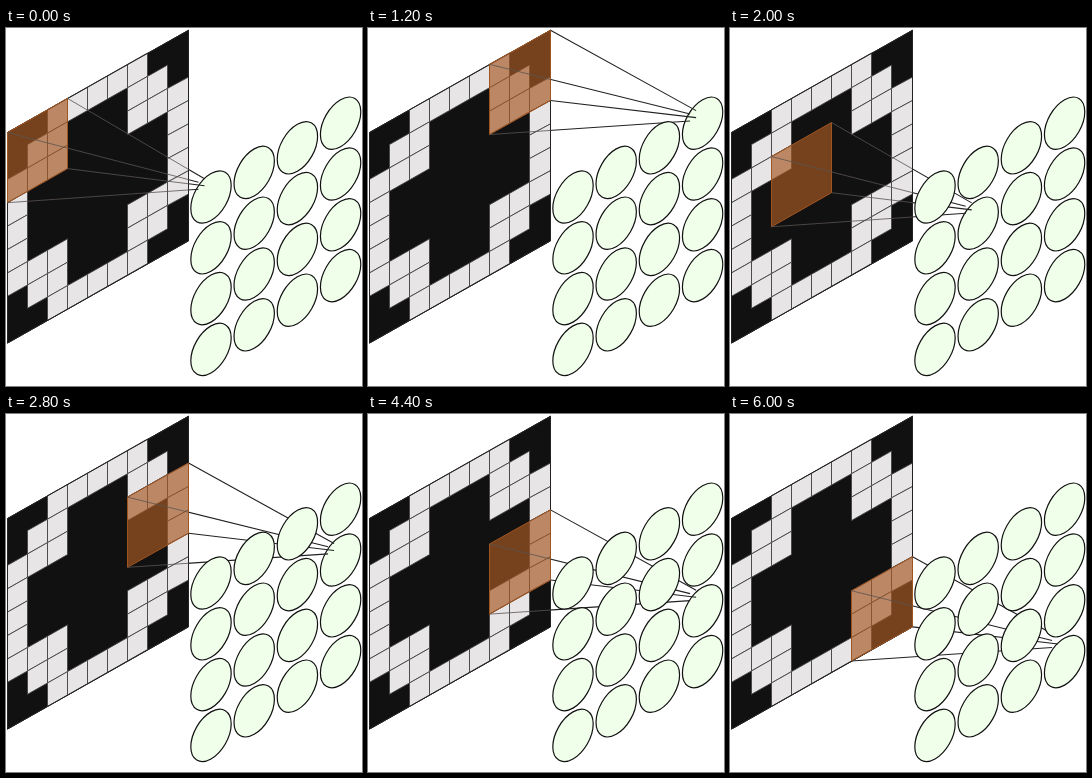
An HTML page with a canvas that plays this animation: 356x358 px, repeating every 6.4 s.

```html
<!DOCTYPE html>
<html lang="en">
<head>
<meta charset="utf-8">
<title>Convolution</title>
<style>
  html, body { margin: 0; width: 100%; height: 100%; overflow: hidden; background: #fff; }
  canvas { display: block; width: 356px; height: 358px; }
</style>
</head>
<body>
<canvas width="356" height="358"></canvas>
<script>
const ctx = document.querySelector('canvas').getContext('2d');
const STEP = 400, SIDE = 4, CELLS = 9, KERNEL = 3, STRIDE = 2;
const CW = 20.08, SKEW = -11.36, CH = 23.4;
const TIP = 0.3;
const ringRows = ['001111100', '011000110', '111000111', '100000001'];

// Grid coordinates to the skewed plane, with crisp vertical edges
const plane = (c, r) => [Math.floor(1.3 + c * CW) + 0.5, 104.5 + c * SKEW + r * CH];

function quad(c, r, size) {
  ctx.beginPath();
  ctx.moveTo(...plane(c, r));
  ctx.lineTo(...plane(c + size, r));
  ctx.lineTo(...plane(c + size, r + size));
  ctx.lineTo(...plane(c, r + size));
  ctx.closePath();
}

function paint(fill, stroke, width) {
  ctx.fillStyle = fill;
  ctx.fill();
  ctx.strokeStyle = stroke;
  ctx.lineWidth = width;
  ctx.stroke();
}

const isLit = (c, r) => (ringRows[Math.min(r, CELLS - 1 - r)] || ringRows[3])[c] === '1';

function drawInput() {
  quad(0, 0, CELLS);
  paint('#111', '#111', 1);
  for (let r = 0; r < CELLS; r++) {
    for (let c = 0; c < CELLS; c++) {
      if (!isLit(c, r)) continue;
      quad(c, r, 1);
      paint('#e8e5e7', '#444', 0.9);
    }
  }
  quad(0, 0, CELLS);
  ctx.strokeStyle = '#222';
  ctx.lineWidth = 1;
  ctx.stroke();
}

function drawNode(c, r) {
  ctx.save();
  ctx.transform(CW, SKEW, 0, CH, 205 + c * 43.2, 169 - c * 24.6 + r * 50.8);
  ctx.beginPath();
  ctx.arc(0, 0, 1.005, 0, Math.PI * 2);
  ctx.restore();
  paint('#f0ffea', '#111', 1.2);
}

// Rays join the kernel corners to a tiny copy of the kernel at the node
function drawRays(col, row, color, width) {
  const c = col * STRIDE, r = row * STRIDE;
  const x = 195.5 + col * 43.2, y = 156 + c * SKEW + r * CH;
  ctx.beginPath();
  for (const u of [0, 1]) {
    for (const v of [0, 1]) {
      const du = (u - 0.5) * TIP, dv = (v - 0.5) * TIP;
      ctx.moveTo(...plane(c + u * KERNEL, r + v * KERNEL));
      ctx.lineTo(x + du * CW, y + du * SKEW + dv * CH);
    }
  }
  ctx.strokeStyle = color;
  ctx.lineWidth = width;
  ctx.stroke();
}

function draw(index) {
  const col = index % SIDE, row = Math.floor(index / SIDE);

  ctx.clearRect(0, 0, 356, 358);
  drawNode(col, row);
  drawRays(col, row, '#222', 1.1);
  drawInput();
  quad(col * STRIDE, row * STRIDE, KERNEL);
  paint('rgba(168, 90, 36, 0.67)', '#a05420', 1);

  // Fainter rays across the input plane
  ctx.save();
  quad(0, 0, CELLS);
  ctx.clip();
  drawRays(col, row, '#5a5450', 0.8);
  ctx.restore();

  for (let i = 0; i < SIDE * SIDE; i++) {
    if (i !== index) drawNode(i % SIDE, Math.floor(i / SIDE));
  }
}

const start = performance.now();
let shown = -1;
function tick() {
  const index = Math.floor((performance.now() - start) / STEP) % (SIDE * SIDE);
  if (index !== shown) draw(shown = index);
  requestAnimationFrame(tick);
}
tick();
</script>
</body>
</html>
```
